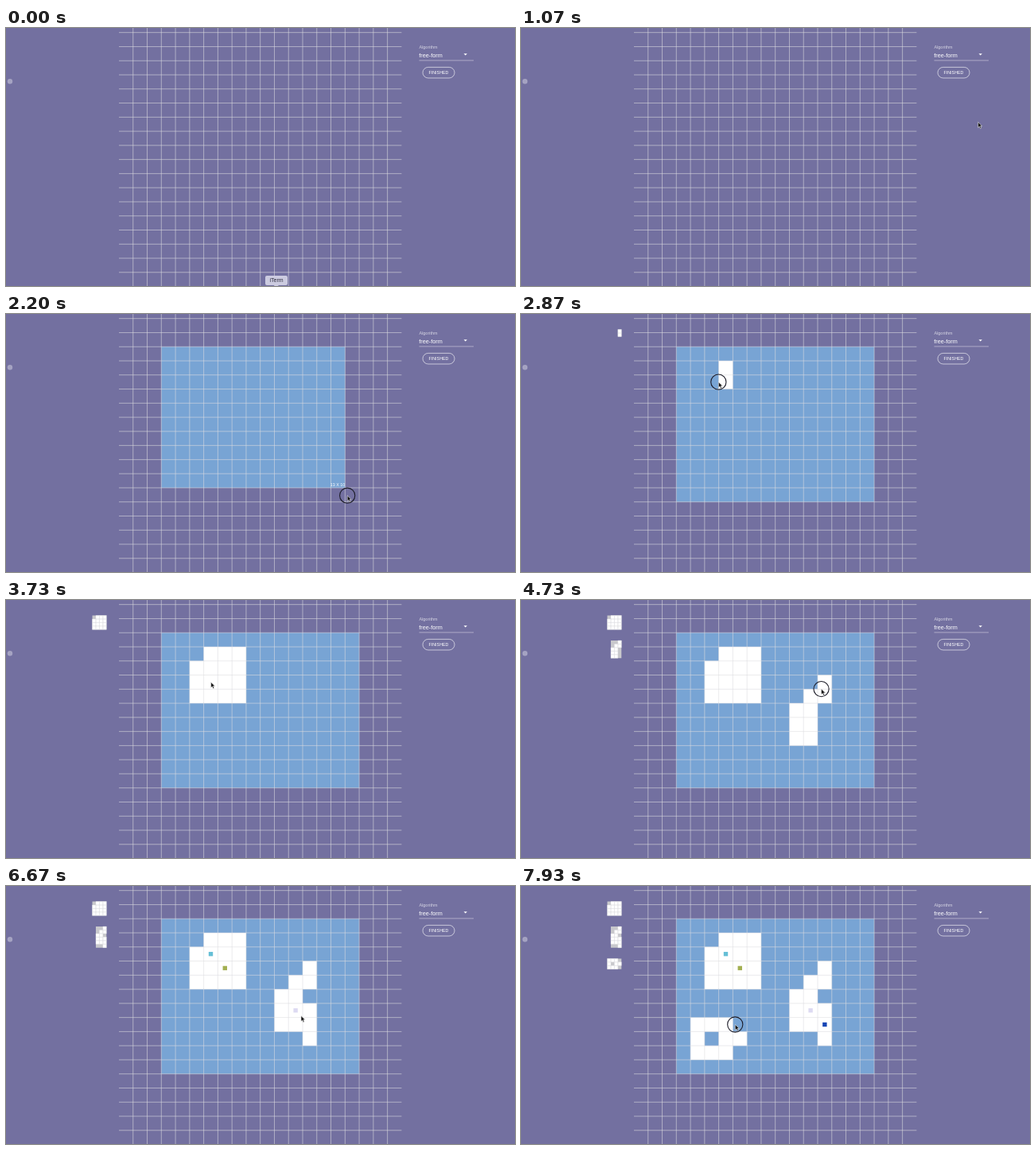
These frames come from a looping animation (640x325 px, 8 s). An HTML page:

```html
<!DOCTYPE html>
<html lang="en">
<head>
<meta charset="utf-8">
<title>Free-form rooms</title>
<style>
html, body { margin: 0; width: 100%; height: 100%; overflow: hidden; background: #7370a0; }
svg { display: block; width: 640px; height: 325px; }
text { font-family: "Liberation Sans", Arial, sans-serif; fill: #fff; }
#dock { animation: dock 8000ms step-end infinite; }
@keyframes dock { 0% { opacity: 1; } 1.6% { opacity: 0; } }
</style>
</head>
<body>
<svg viewBox="0 0 640 325">
  <circle cx="5" cy="67.3" r="3.2" fill="#a5a3c2"/>
  <rect id="area" fill="#78a4d4"/>
  <path id="cells" fill="#fff"/>
  <path id="grid" stroke="#dcdce0" stroke-width=".58" fill="none"/>
  <text id="size" font-size="5.4" text-anchor="end"></text>
  <g id="dots"></g>
  <path id="thumbGaps" fill="#c8c8cc"/>
  <path id="thumbCells" fill="#fff" stroke="#d9d9df" stroke-width=".4"/>

  <text x="519.5" y="25.7" font-size="5.45" fill-opacity=".72">Algorithm</text>
  <text x="519.3" y="36.5" font-size="7.25">free-form</text>
  <path d="M575.5 32.3h4.4l-2.2 2.2z" fill="#fff"/>
  <path d="M519.5 40.9H588" stroke="#dcdbe6" stroke-width=".55"/>
  <rect x="524" y="49.4" width="40" height="13.6" rx="6.8" fill="none" stroke="#fff" stroke-width=".6"/>
  <text x="544" y="58.1" font-size="5.35" text-anchor="middle">FINISHED</text>

  <g id="dock">
    <path d="M328 312H352a2 2 0 0 1 2 2v8a2 2 0 0 1-2 2h-9l-3 2.5-3-2.5h-9a2 2 0 0 1-2-2v-8a2 2 0 0 1 2-2z" fill="#cccbe0"/>
    <text x="340" y="320.3" font-size="7" text-anchor="middle" style="fill:#2c2b3c">iTerm</text>
  </g>
  <g id="pointer">
    <circle id="ring" r="9.6" fill="none" stroke="#1c1c28" stroke-width="1.1"/>
    <path d="M0 0v7l1.6-1.5 1.2 2.6 1.3-.6-1.2-2.5h2.2z" fill="#111" stroke="#eee" stroke-width=".6"/>
  </g>
</svg>
<script>
const LOOP = 8000, STEP = 17.77, LEFT = 142, TOP = 5.7;
const PACE = 68, LAG = 40, CLICK_EVERY = 380, CLICK_HOLD = 45;
const THUMB = STEP / 4, THUMB_RIGHT = 126.3, THUMB_TOP = 19.5, THUMB_GAP = 13.75;

const el = id => document.getElementById(id);
const px = u => LEFT + STEP * u;
const py = v => TOP + STEP * v;
const block = (x, y, w, h = w) => `M${x} ${y}h${w}v${h}h${-w}z`;
const span = list => [Math.min(...list), Math.max(...list)];

const linear = k => k;
const smooth = k => k * k * (3 - 2 * k);
const easeOut = k => 1 - (1 - k) ** 3;

// Pointer stops in grid units; ease describes the way to a stop.
const stops = [];
const stop = (t, u, v, ease = smooth, down = false) => stops.push({ t, u, v, ease, down });

// Drags at constant pace through the centres of the corner cells.
function drag(start, corners) {
  let t = start;
  corners.forEach(([c, r], i) => {
    const [c0, r0] = corners[i - 1] || [c, r];
    t += PACE * Math.hypot(c - c0, r - r0);
    stop(t, c + .5, r + .5, i ? linear : smooth, i > 0);
  });
  return { start, end: t };
}

stop(0, 11.4, 18.5);
stop(450, 26.5, 10);
stop(800, 24.35, 6.35);
stop(1070, 24.35, 6.35);
stop(1450, 13.5, 10.6);
const areaStart = { t: 1790, u: 3.4, v: 2.74 }, areaEnd = 2364;
stop(areaStart.t, areaStart.u, areaStart.v);
stop(areaEnd, 16.46, 12.78, easeOut, true);

const strokes = [drag(2768, [[6, 3], [6, 4], [5, 4], [5, 6], [8, 6], [8, 3], [7, 3], [7, 5], [6, 5]])];
strokes.push(drag(4150, [[11, 7], [11, 9], [12, 9], [12, 6], [13, 6], [13, 5], [12, 7], [12, 8], [13, 8], [13, 10]]));
const clicks = [
  { c: 6, r: 4, fill: "#66bfd6" },
  { c: 7, r: 5, fill: "#a3b052" },
  { c: 12, r: 8, fill: "#dddaf2" },
  { c: 13, r: 9, fill: "#1746b5" }
].map((click, i) => ({ ...click, at: 5750 + i * CLICK_EVERY }));
clicks.forEach(({ at, c, r }) => stop(at, c + .5, r + .5));
strokes.push(drag(7342, [[7, 10], [6, 10], [6, 11], [4, 11], [4, 9], [7, 9]]));
stop(LOOP, 7.5, 9.5);

function pointerAt(t) {
  const i = Math.max(1, stops.findIndex(s => s.t >= t));
  const a = stops[i - 1], b = stops[i];
  const k = b.ease((t - a.t) / (b.t - a.t));
  return { u: a.u + (b.u - a.u) * k, v: a.v + (b.v - a.v) * k, down: b.down };
}

// Every cell a drag crosses, with the time it fills.
const rooms = strokes.map(({ start, end }) => {
  const seen = new Map();
  for (let t = start; t < end; t += 4) {
    const p = pointerAt(t), c = Math.floor(p.u), r = Math.floor(p.v), key = c + "," + r;
    if (!seen.has(key)) seen.set(key, { c, r, at: t + LAG });
  }
  return [...seen.values()];
});

let lines = "";
for (let i = 0; i < 20; i++) {
  if (i) lines += `M${px(i)} 0V325`;
  lines += `M${LEFT} ${py(i)}H497.4`;
}
el("grid").setAttribute("d", lines);

for (const click of clicks) {
  click.dot = document.createElementNS("http://www.w3.org/2000/svg", "path");
  click.dot.setAttribute("d", block(px(click.c + .5) - 2.7, py(click.r + .5) - 2.7, 5.4));
  click.dot.setAttribute("fill", click.fill);
  el("dots").append(click.dot);
}

function drawArea(t) {
  const begun = t > areaStart.t, p = pointerAt(Math.min(t, areaEnd));
  const w = begun ? Math.ceil(p.u - areaStart.u) : 0;
  const h = begun ? Math.ceil(p.v - areaStart.v) : 0;
  const c = Math.floor(areaStart.u), r = Math.floor(areaStart.v);
  const place = { x: px(c), y: py(r), width: w * STEP, height: h * STEP };
  for (const name in place) el("area").setAttribute(name, place[name]);
  el("size").textContent = begun && t < areaEnd ? `${w} X ${h}` : "";
  el("size").setAttribute("x", px(c + w));
  el("size").setAttribute("y", py(r + h) - 1.5);
}

function drawRooms(t) {
  let cells = "", thumbs = "", gaps = "", top = THUMB_TOP;
  for (const room of rooms) {
    const shown = room.filter(cell => cell.at <= t);
    if (!shown.length) continue;
    const [c0, c1] = span(shown.map(cell => cell.c));
    const [r0, r1] = span(shown.map(cell => cell.r));
    const w = (c1 - c0 + 1) * THUMB, h = (r1 - r0 + 1) * THUMB, left = THUMB_RIGHT - w;
    gaps += block(left, top, w, h);
    for (const { c, r } of shown) {
      cells += block(px(c), py(r), STEP);
      thumbs += block(left + (c - c0) * THUMB, top + (r - r0) * THUMB, THUMB);
    }
    top += h + THUMB_GAP;
  }
  el("cells").setAttribute("d", cells);
  el("thumbCells").setAttribute("d", thumbs);
  el("thumbGaps").setAttribute("d", gaps);
}

const show = (node, on) => node.setAttribute("visibility", on ? "visible" : "hidden");

function frame(now) {
  const t = now % LOOP, p = pointerAt(t);
  drawArea(t);
  drawRooms(t);
  clicks.forEach(({ dot, at }) => show(dot, t >= at));
  show(el("ring"), p.down || clicks.some(({ at }) => Math.abs(t - at) < CLICK_HOLD));
  el("pointer").setAttribute("transform", `translate(${px(p.u)} ${py(p.v)})`);
  requestAnimationFrame(frame);
}
frame(performance.now());
</script>
</body>
</html>
```
